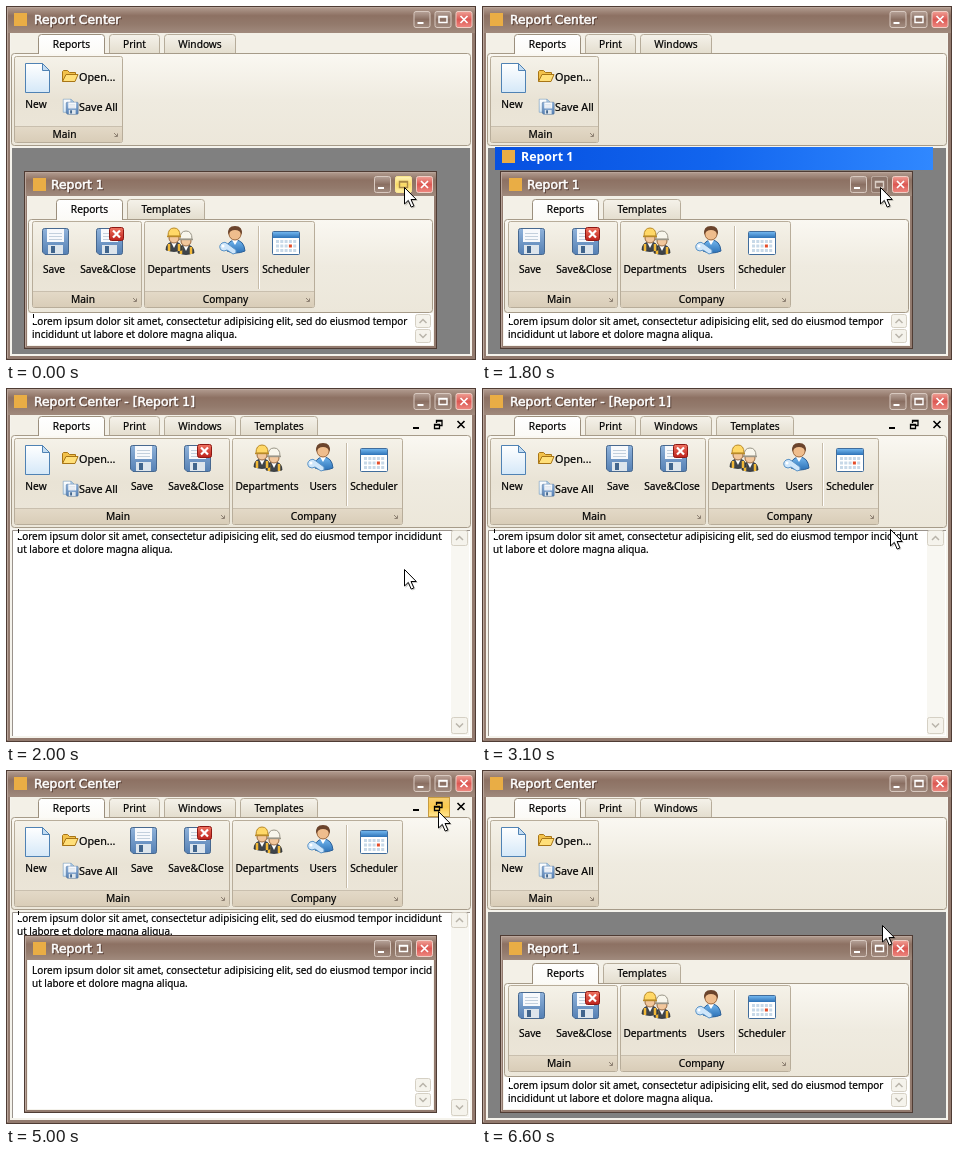
An HTML page for the animation above (6.7 s loop, 470 by 354 pixels).

```html
<!DOCTYPE html>
<html lang="en">
<head>
<meta charset="utf-8">
<title>Report Center</title>
<style>
html, body { margin: 0; width: 100%; height: 100%; overflow: hidden; background: #808080; }
svg { display: block; width: 100vw; height: 100vh; }
text { font: 10.2px "Noto Sans", "Open Sans", sans-serif; fill: #000; stroke: #000; stroke-width: .2; white-space: pre; }
.title { font: 12.35px "DejaVu Sans", sans-serif; fill: #fff; stroke: #fff; stroke-width: .55; }
.shade { fill: #5b4238; stroke: #5b4238; }
.zoomTitle { font-size: 12.4px; font-weight: 700; fill: #fff; stroke: none; }
.doc { font-size: 9.95px; }
.tool { font-size: 10.8px; }
.mid { text-anchor: middle; }
</style>
</head>
<body>
<svg id="stage" viewBox="0 0 470 354" preserveAspectRatio="none"></svg>
<script>
const LOOP = 6700;
const CREAM = '#f5f3ec';
const stage = document.getElementById('stage');

const gradient = (id, colors, horizontal) =>
  `<linearGradient id="${id}" x2="${horizontal ? 1 : 0}" y2="${horizontal ? 0 : 1}">` +
  colors.map((c, i) => `<stop offset="${i / (colors.length - 1)}" stop-color="${c}"/>`).join('') +
  '</linearGradient>';
const fill = (x, y, w, h, color, extra = '') =>
  `<rect x="${x}" y="${y}" width="${w}" height="${h}" fill="${color}" ${extra}/>`;
const box = (x, y, w, h, color, stroke, r = 0) =>
  fill(x + .5, y + .5, w - 1, h - 1, color, `stroke="${stroke}" rx="${r}"`);
const path = (d, color = 'none', stroke = 'none', width = 1) =>
  `<path d="${d}" fill="${color}" stroke="${stroke}" stroke-width="${width}"/>`;
const circle = (x, y, r, color, stroke = 'none') =>
  `<circle cx="${x}" cy="${y}" r="${r}" fill="${color}" stroke="${stroke}"/>`;
const text = (x, y, s, cls = '') =>
  `<text x="${x}" y="${y}" class="${cls}">${s.replace('&', '&amp;')}</text>`;
const label = (x, y, s) => text(x, y, s, 'mid');
const at = (x, y, content, scale = 1) =>
  `<g transform="translate(${x} ${y}) scale(${scale})">${content}</g>`;
const part = (id, content) => `<g id="${id}">${content}</g>`;
const title = (x, y, s) => text(x + 1, y + 1, s, 'title shade') + text(x, y, s, 'title');

// Window chrome
const appIcon = (x, y) => fill(x, y, 13, 13, '#e9ad45');
const minGlyph = path('M4 12h6', 'none', '#fff', 2);
const maxGlyph = color => path('M4.500 5.500h8v6h-8zM4 6h9', 'none', color, 1.4);
const closeGlyph = path('M5 5l7 7M12 5l-7 7', 'none', '#fff', 1.7);
const capButton = (x, y, glyph, face = 'url(#button)', edge = '#d8c9c0') =>
  at(x, y, box(0, 0, 17, 17, face, edge, 2) + glyph);
const capButtons = (x, y) => capButton(x, y, minGlyph) +
  capButton(x + 21, y, maxGlyph('#fff')) + capButton(x + 42, y, closeGlyph, 'url(#close)', '#f0cfc6');
const frame = (x, y, w, h, bar, edge) =>
  box(x, y, w, h, '#927a6e', '#4f3c34') + fill(x + 1, y + 1, w - 2, bar - 1, 'url(#titlebar)') +
  path(`M${x + 1.5} ${y + h - 2}V${y + 1.5}H${x + w - 2}`, 'none', '#baa69b') +
  fill(x + edge, y + bar, w - 2 * edge, h - bar - edge, CREAM);

// Ribbon
const tab = (x, y, w, h, name, active) =>
  path(`M${x + .5} ${y + h}V${y + 3.5}q0-3 3-3H${x + w - 3.5}q3 0 3 3V${y + h}`,
    active ? 'url(#tabOn)' : 'url(#tabOff)', active ? '#9b8f7d' : '#b6ac9a') +
  label(x + w / 2, y + 14, name);
const ribbon = (x, y, w, strip, height) =>
  fill(x, y, w, strip + height, '#f3f0e7') +
  box(x, y + strip, w, height, 'url(#panel)', '#a69b89', 3);
const group = (x, y, w, name) =>
  box(x, y, w, 87, 'url(#group)', '#b8ad9a', 2) +
  fill(x + 1, y + 71, w - 2, 15, 'url(#caption)') +
  path(`M${x + 1} ${y + 70.5}h${w - 2}`, 'none', '#c9bfae') +
  label(x + w / 2 - 4, y + 82, name) +
  path(`M${x + w - 9} ${y + 77}l3 3M${x + w - 8.5} ${y + 80.5}h3v-3`, 'none', '#85786a', .9);

// Icons, drawn from their top left corner
const page = path('M.5.5h17l7 7v22H.5z', 'url(#paper)', '#4f82b4') +
  path('M17.5.5v7h7z', '#c3dcf2', '#4f82b4');
const folder = path('M.5 12.500V2.500l1-1h4l2 2h6v3', '#f2c14b', '#a87516') +
  path('M.5 12.500l3.500-7h12l-3 7z', '#ffdf79', '#a87516');
const floppy = path('M.5 2.500q0-2 2-2h22q2 0 2 2v22q0 2-2 2H3l-2.500-2.500z', 'url(#disk)', '#47688f') +
  fill(5, 1, 17, 13, '#f7f9fc') + path('M7 5.500h13M7 8.500h13M7 11.500h13', 'none', '#c3d0dd') +
  fill(6, 17, 15, 9, '#dde5ec') + fill(9, 18, 4, 7, '#41658d');
const cross = box(0, 0, 15, 14, 'url(#red)', '#8d1712', 2) +
  path('M4 3.500l7 7M11 3.500l-7 7', 'none', '#fff', 2.2);
const worker = (hat, brim) =>
  path('M0 23q0-8 8-8t8 8q-8 3-16 0z', '#3f444a', '#2b3035', .8) +
  path('M3 17v7M13 17v7', 'none', '#f0b838', 2.5) + path('M5 15l3 6 3-6z', '#fff') +
  circle(8, 11, 5, '#f2c79c', '#98683f') +
  path('M2 9q0-8 6-8t6 8z', hat, brim) + path('M1 9.500h14', 'none', brim, 1.4);
const departments = at(12, 3, worker('#f8f6ec', '#9a9688')) + at(0, 0, worker('#ffd867', '#b98a28'));
const user = path('M8 25q-1-10 8-11 9 0 10 11-9 4-18 0z', 'url(#blue)', '#2a5f98') +
  path('M13 14l3 5 3-5z', '#fff') + circle(16, 8, 6, '#efbd8d', '#9c673c') +
  path('M9 9Q8 0 16 0t7 9q-2-5-7-5t-7 5z', '#6b442c') +
  path('M9 18q-3-3-6-1-4 3-1 7 3 2 6 0l6 4 3-1v-3z', '#cfe6fa', '#5a93c6') + circle(4, 20, 1.5, '#fff');
const calendar = box(0, 0, 28, 24, '#fff', '#416d9c', 1) + fill(1, 1, 26, 6, 'url(#blue)') +
  [0, 1, 2].map(row => [0, 1, 2, 3, 4].map(col =>
    fill(4 + col * 4.3, 9 + row * 4.5, 3, 3, row === 1 && col === 3 ? '#e54c28' : '#c8d9e8')).join('')).join('');

const fileTools = at(19, 57, page) + label(30, 102, 'New') +
  at(56, 63, folder) + text(73, 75, 'Open...', 'tool') +
  at(57, 93, page, .45) + at(60, 96, floppy, .46) + text(73, 105, 'Save All', 'tool');
const reportTools = at(36, 57, floppy) + label(48, 102, 'Save') +
  at(90, 57, floppy) + at(103, 56, cross) + label(102, 102, 'Save&Close');
const companyTools = at(160, 56, departments) + label(173, 102, 'Departments') +
  at(213, 55, user) + label(229, 102, 'Users') +
  path('M252.500 55v63', 'none', '#c6bba8') + path('M253.500 55v63', 'none', '#fff') +
  at(266, 60, calendar) + label(280, 102, 'Scheduler');

// Document
const lorem = 'Lorem ipsum dolor sit amet, consectetur adipisicing elit, sed do eiusmod tempor';
const tail = 'ut labore et dolore magna aliqua.';
const words = (x, y, first, second) => text(x, y, first, 'doc') + text(x, y + 13, second, 'doc');
const caret = (x, y) => fill(x, y - 9, 3, 7, '#fff') + fill(x + 1, y - 11, 1, 4, '#000');
const arrow = (x, y, w, h, down) => box(x, y, w, h, CREAM, '#d5d0c4', 2) +
  path(`M${x + w / 2 - 3.500} ${y + h / 2 + (down ? -2 : 2)}l3.500 ${down ? 3.500 : -3.500} 3.500 ${down ? -3.500 : 3.500}`, 'none', '#b9b4aa', 1.5);
const smallScroll = arrow(409, 308, 16, 14) + arrow(409, 323, 16, 14, true);

const mdiButtons = part('restoreHover', box(422, 27, 22, 20, 'url(#hover)', '#d9b95e')) +
  part('restorePress', box(422, 27, 22, 20, 'url(#press)', '#c79b3f')) +
  fill(407, 39, 6, 2, '#000') +
  path('M430.500 35v-2.500h5.500v5h-2M430 33h6M428.500 36.500h5v4h-5zM428 37h6', 'none', '#000', 1.3) +
  path('M451.500 33l7 7M458.500 33l-7 7', 'none', '#000', 1.6);

stage.innerHTML = '<defs>' +
  gradient('titlebar', ['#b39d91', '#8d7163', '#937a6c', '#a08a7d']) +
  gradient('button', ['#b7a399', '#8a6f62', '#a38d81']) +
  gradient('close', ['#f0a095', '#dc5853', '#ee8880']) +
  gradient('hover', ['#fff4bd', '#f9d964', '#fff0a8']) +
  gradient('press', ['#f6ce72', '#fbc94c', '#ffe691']) +
  gradient('tabOn', ['#fff', '#fbfaf6']) + gradient('tabOff', ['#f5f2ea', '#e4decf']) +
  gradient('panel', ['#faf8f2', '#efebe0', '#ece7da']) +
  gradient('group', ['#f5f2e9', '#e9e3d5', '#ece6d9']) +
  gradient('caption', ['#e3d9c7', '#d9cdb8']) +
  gradient('paper', ['#fff', '#d5e8f8']) + gradient('disk', ['#8fb2da', '#5580b4']) +
  gradient('red', ['#f07461', '#bd211b']) + gradient('blue', ['#72b6ee', '#2d72b7']) +
  gradient('zoomFill', ['#0650e0', '#1265ee', '#3088ff'], true) +
  '<clipPath id="clientClip"><path d="M22 190h405v149H22z"/></clipPath></defs>' +
  frame(0, 0, 470, 354, 27, 4) + appIcon(8, 7) +
  part('titleShort', title(28, 18, 'Report Center')) +
  part('titleLong', title(28, 18, 'Report Center - [Report 1]')) +
  capButtons(407.5, 5) +
  ribbon(5, 27, 460, 20, 93) +
  tab(32, 28, 67, 20, 'Reports', true) + tab(103, 28, 51, 19, 'Print') + tab(158, 28, 72, 19, 'Windows') +
  part('solo', group(8, 50, 109, 'Main')) +
  part('merged', tab(234, 28, 78, 19, 'Templates') + group(8, 50, 216, 'Main') +
    group(226, 50, 171, 'Company') + at(88, 0, reportTools + companyTools) + mdiButtons) +
  fileTools +
  fill(6, 142, 458, 206, '#808080') +
  part('document', fill(6, 142, 458, 206, '#fff') +
    path('M6.500 348V142.500H464', 'none', '#9a938c') +
    words(11, 152, lorem + ' incididunt', tail) + caret(11, 152) +
    fill(445, 143, 18, 204, '#f8f7f2') + arrow(445, 142, 17, 16) + arrow(445, 329, 17, 17, true)) +
  part('child', frame(18, 165, 413, 178, 25, 3) + appIcon(27, 172) + title(45, 183, 'Report 1') +
    capButtons(368, 170) +
    part('maxHover', capButton(389, 170, maxGlyph('#a98747'), 'url(#hover)', '#fbe58c')) +
    part('maxPress', capButton(389, 170, maxGlyph('#d9cdc4'), '#8d7569', '#b9a69b')) +
    fill(22, 190, 405, 149, '#fff') +
    part('childRibbon', ribbon(22, 190, 405, 23, 94) +
      tab(50, 193, 67, 21, 'Reports', true) + tab(121, 193, 78, 20, 'Templates') +
      group(26, 215, 110, 'Main') + group(138, 215, 171, 'Company') +
      at(0, 165, reportTools + companyTools) +
      words(26, 319, lorem, 'incididunt ' + tail) + caret(26, 319)) +
    part('childPlain', '<g clip-path="url(#clientClip)">' +
      words(26, 204, lorem + ' incididunt', tail) + '</g>') +
    smallScroll) +
  part('zoom', '<rect id="zoomBar" height="23" fill="url(#zoomFill)"/>' +
    appIcon(7, 3) + text(26, 14, 'Report 1', 'zoomTitle')) +
  part('cursor', path('M1.500 2v17l4-4 3 6.500 3-1.500-3-6h5.500z', '#0003') +
    path('M.5.5v16.500l3.800-3.600 2.900 6.700 2.700-1.200-2.900-6.400h5.300z', '#fff', '#000'));

const nodes = {};
stage.querySelectorAll('g[id], #zoomBar').forEach(n => nodes[n.id] = n);
const show = (id, on) => nodes[id].setAttribute('display', on ? 'inline' : 'none');
const move = (id, x, y) => nodes[id].setAttribute('transform', `translate(${x} ${y})`);

const startPoint = [398, 181], endPoint = [432, 41];
const returnPath = [[425, 58], [413, 82], [402, 104], [394, 122], [392, 139], [400, 155]];

function cursorAt(t) {
  if (t < 3000) return startPoint;
  if (t < 6100) {
    const k = Math.min(1, (Math.floor((t - 3000) / 100) + 1) / 7);
    return startPoint.map((v, i) => Math.round(v + (endPoint[i] - v) * k));
  }
  return returnPath[Math.min(5, Math.floor((t - 6100) / 100))];
}

function render(t) {
  const within = (a, b) => t >= a && t < b;
  const merged = within(2000, 5100);
  const zooming = within(1700, 1900) || within(4900, 5000);
  const longTitle = within(1900, 5000);
  show('titleLong', longTitle);
  show('titleShort', !longTitle);
  show('merged', merged);
  show('solo', !merged);
  show('document', within(1900, 5100));
  show('child', !within(1900, 5000));
  show('childPlain', within(5000, 5100));
  show('childRibbon', !within(5000, 5100));
  show('maxHover', t < 1500);
  show('maxPress', within(1500, 1900));
  show('restoreHover', within(3600, 4700));
  nodes.restoreHover.setAttribute('opacity', t < 3700 ? .5 : 1);
  show('restorePress', within(4700, 5100));
  show('zoom', zooming);
  if (zooming) {
    const first = t < 1800;
    move('zoom', first ? 16 : 13, first ? 154 : 141);
    nodes.zoomBar.setAttribute('width', first ? 425 : 438);
  }
  move('cursor', ...cursorAt(t));
}

const started = performance.now();
function tick() {
  render((performance.now() - started) % LOOP);
  requestAnimationFrame(tick);
}
tick();
</script>
</body>
</html>
```
